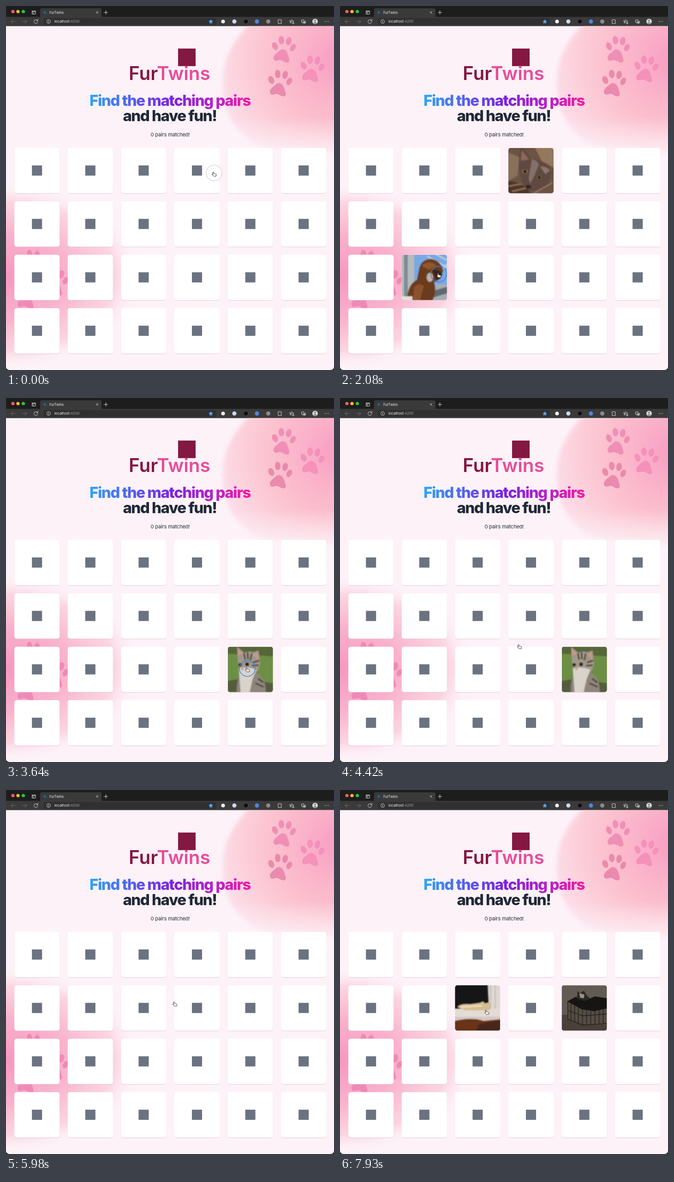
An HTML page for the animation above (8000 ms loop, 711 px wide and 787 px high).

```html
<!DOCTYPE html>
<html lang="en">
<head>
<meta charset="utf-8">
<title>FurTwins</title>
<style>
  html, body { margin: 0; width: 100%; height: 100%; overflow: hidden; background: #151515; }
  svg { display: block; width: 711px; height: 787px; font-family: Inter, "Liberation Sans", sans-serif; }
  .line { fill: none; stroke: #d8d8d8; stroke-linecap: round; stroke-linejoin: round; }
  .dim { stroke: #6d6d6d; }
  .title { font-size: 33px; font-weight: 800; letter-spacing: -.045em; text-anchor: middle; }
  .logo { font-size: 40.5px; font-weight: 600; }

  .shot { opacity: 0; animation: 8s step-end infinite; }
  #shot0 { animation-name: show0; }
  #shot1 { animation-name: show1; }
  #shot2 { animation-name: show2; }
  #shot3 { animation-name: show3; }
  #shot4 { animation-name: show4; }
  #shot5 { animation-name: show5; }
  @keyframes show0 { 0%, 37.4% { opacity: 0 } 1.6% { opacity: 1 } }
  @keyframes show1 { 0%, 37.4% { opacity: 0 } 24.4% { opacity: 1 } }
  @keyframes show2 { 0%, 74.7% { opacity: 0 } 43.9% { opacity: 1 } }
  @keyframes show3 { 0%, 74.7% { opacity: 0 } 61.7% { opacity: 1 } }
  @keyframes show4 { 0% { opacity: 0 } 81.2%, 100% { opacity: 1 } }
  @keyframes show5 { 0% { opacity: 0 } 94.2%, 100% { opacity: 1 } }

  /* the pointer rests on each card after a tap, then glides to the next */
  #cursor { animation: move 8s ease-in-out infinite; }
  @keyframes move {
    0% { transform: translate(451px, 364px) }
    9% { transform: translate(451px, 364px); animation-timing-function: ease-in }
    13% { transform: translate(438px, 408px); animation-timing-function: cubic-bezier(.3, .4, .3, 1) }
    22.5%, 30% { transform: translate(214px, 583px) }
    42.5%, 51% { transform: translate(523px, 588px) }
    60.5%, 69% { transform: translate(197px, 467px) }
    80%, 87% { transform: translate(509px, 460px) }
    93.2%, 100% { transform: translate(318px, 481px) }
  }
  .tap { opacity: 0; animation: tap 8s linear infinite; animation-delay: calc(var(--at) * 1ms - 8s); }
  @keyframes tap {
    0% { opacity: 1; stroke: #d9d9e2; fill: rgba(255, 255, 255, .8) }
    1% { opacity: 1; stroke: #3b82e0; fill: rgba(255, 255, 255, 0) }
    3.4% { opacity: .9; stroke: #3b82e0; fill: rgba(255, 255, 255, 0) }
    5%, 100% { opacity: 0; stroke: #3b82e0; fill: rgba(255, 255, 255, 0) }
  }
</style>
</head>
<body>
<svg viewBox="0 0 711 787">
  <defs>
    <linearGradient id="rainbow" gradientUnits="userSpaceOnUse" x1="180" x2="532">
      <stop stop-color="#2aa6f4"/><stop offset=".28" stop-color="#5659f2"/>
      <stop offset=".5" stop-color="#7a22e2"/><stop offset=".78" stop-color="#bd1fc6"/>
      <stop offset="1" stop-color="#f41ba2"/>
    </linearGradient>
    <radialGradient id="glowRight" gradientUnits="userSpaceOnUse" cx="725" cy="115" r="262">
      <stop stop-color="#f79cc3"/><stop offset=".3" stop-color="#fab1c9"/>
      <stop offset=".6" stop-color="#fcc2cf"/><stop offset="1" stop-color="#fcdce6"/>
    </radialGradient>
    <radialGradient id="glowLeft">
      <stop stop-color="#f798c0"/><stop offset=".45" stop-color="#f9aeca" stop-opacity=".95"/>
      <stop offset=".8" stop-color="#fbc0d2" stop-opacity=".6"/><stop offset="1" stop-color="#fdf2f8" stop-opacity="0"/>
    </radialGradient>
    <linearGradient id="fade" x2="0" y2="1">
      <stop stop-color="#fdf2f8" stop-opacity="0"/><stop offset="1" stop-color="#fdf2f8"/>
    </linearGradient>
    <filter id="soft"><feGaussianBlur stdDeviation="5"/></filter>
    <filter id="fuzz"><feGaussianBlur stdDeviation="1"/></filter>
    <clipPath id="page"><path d="M0 43.500H711V779q0 8-8 8H8q-8 0-8-8Z"/></clipPath>
    <clipPath id="frame"><rect width="98" height="98" rx="5"/></clipPath>
    <g id="paw">
      <ellipse cx="-19" cy="-7" rx="6" ry="9" transform="rotate(-24 -19 -7)"/>
      <ellipse cx="-5" cy="-20" rx="6" ry="9" transform="rotate(-5 -5 -20)"/>
      <ellipse cx="11" cy="-18" rx="6" ry="9" transform="rotate(12 11 -18)"/>
      <ellipse cx="20" cy="-4" rx="5.5" ry="8.500" transform="rotate(28 20 -4)"/>
      <path d="M-22 18C-22 11-11 5-7 1-3-3 6 1 9 10 11 20 16 25 9 28 3 30-1 23-8 23-15 24-21 28-22 18Z"/>
    </g>
    <g id="card">
      <rect y="1.200" width="98" height="98" rx="5" fill="#d9c3d0" opacity=".65"/>
      <rect width="98" height="98" rx="5" fill="#fff"/>
      <rect x="38" y="38" width="22" height="22" fill="#6b7280"/>
    </g>
  </defs>

  <!-- browser bars -->
  <rect width="711" height="46" fill="#1d1d1e"/>
  <path d="M74 23.500V8q0-3 3-3H204q3 0 3 3V23.500H711V44H0V23.500Z" fill="#3a3a3b"/>
  <rect x="82" y="26" width="373" height="15" rx="3" fill="#303031"/>
  <circle cx="15" cy="12" r="3.600" fill="#ff5f57"/>
  <circle cx="26" cy="12" r="3.600" fill="#febc2e"/>
  <circle cx="37.500" cy="12" r="3.600" fill="#28c840"/>
  <circle cx="84" cy="14" r="3" fill="#1d5f8f"/>
  <text x="94" y="17" font-size="7.4" fill="#f0f0f0">FurTwins</text>
  <text x="105" y="36.300" font-size="7.7" fill="#f2f2f2">localhost<tspan fill="#a5a5a5">:4200</tspan></text>
  <g class="line">
    <path d="M57 10.500H64V17.500H57ZM57 12.500H64M59 12.500V17.500M195.500 12l4 4m0-4l-4 4M216.500 10v8m-4-4h8"/>
    <path class="dim" d="M20 33.500H11l4-4m-4 4l4 4M36 33.500h9l-4-4m4 4l-4 4"/>
    <path d="M68.500 31.500A4.200 4.200 0 1 0 69 34.500M69 29v3h-3"/>
    <circle cx="92.500" cy="33.500" r="4"/><path d="M92.500 33v2.500M92.500 31.300v.1"/>
    <path d="M590 30h2q1-2 2 0h3v3q-2 .7 0 2v3h-7v-3q2-1 0-2Z"/>
    <path d="M619 29l1.300 3 3.500.3-2.700 2.300M618 36l-2 1 .5-3-2-2 3-.3ZM620 37h5m-2.500-2.500v5"/>
    <path d="M641 30h5v5h-5ZM643 37h6v-5m-2 1.500v4m-2-2h4"/>
  </g>
  <path d="M444 28.500l1.500 3.300 3.600.4-2.700 2.400.8 3.600-3.200-1.800-3.200 1.800.8-3.600-2.700-2.400 3.600-.4Z" fill="#5ba4f5"/>
  <circle cx="470.500" cy="33.500" r="4" fill="#f1f1f1"/>
  <circle cx="495" cy="33.500" r="4.500" fill="#c9d8ee"/>
  <circle cx="520" cy="33.500" r="4" fill="#0c0c0c"/>
  <circle cx="544" cy="33.500" r="4.500" fill="#4d86e8"/>
  <circle cx="568.500" cy="33.500" r="4.500" fill="#8b8b8b"/>
  <circle cx="670" cy="33.500" r="6" fill="#d6d6d6"/>
  <circle cx="670" cy="31.700" r="2.100" fill="#8c8c8c"/><path d="M666 37.500q4-6 8 0-4 3-8 0" fill="#8c8c8c"/>
  <path d="M692 33.500h.1m3.400 0h.1m3.400 0h.1" class="line" stroke-width="1.600"/>

  <!-- page -->
  <g clip-path="url(#page)">
    <rect y="43" width="711" height="744" fill="#fdf2f8"/>
    <path d="M537 30C488 75 469 120 470 172 472 235 500 270 537 298 600 320 680 300 740 330V30Z" fill="url(#glowRight)" filter="url(#soft)"/>
    <rect x="455" y="240" width="256" height="95" fill="url(#fade)"/>
    <ellipse cx="0" cy="585" rx="295" ry="200" fill="url(#glowLeft)"/>
    <use href="#paw" x="602" y="94" fill="#f08fb6"/>
    <use href="#paw" x="664" y="136" fill="#f591ba"/>
    <use href="#paw" x="594" y="167" fill="#ea8aac"/>
    <g fill="#f189b5">
      <use href="#paw" x="56" y="556"/><use href="#paw" x="109" y="598"/><use href="#paw" x="47" y="626"/>
    </g>
    <rect x="373" y="92" width="38" height="38" fill="#831843"/>
    <text class="logo" x="266" y="160" fill="#831843">Fur<tspan fill="#e64d99">Twins</tspan></text>
    <text class="title" x="355.500" y="216" fill="url(#rainbow)">Find the matching pairs</text>
    <text class="title" x="355" y="249" fill="#1f2937">and have fun!</text>
    <text x="356" y="281.800" font-size="11" letter-spacing="-.15" text-anchor="middle" fill="#1f2937">0 pairs matched!</text>
    <g id="cards"></g>
  </g>

  <!-- photos -->
  <g id="shot0" class="shot"><g clip-path="url(#frame)"><g filter="url(#fuzz)">
    <path d="M-5-5H103V103H-5Z" fill="#6c5342"/>
    <path d="M55-5H103V45L72 28Z" fill="#94795f"/>
    <path d="M-5 8L24 20 20 60-5 75Z" fill="#88705a"/>
    <path d="M22 38L25 2q2-5 8 0L50 24Q82 25 94 52L86 82Q65 99 41 91 25 72 22 38Z" fill="#614a40"/>
    <path d="M27 28L29 5 45 25Z" fill="#8a6a5a"/>
    <path d="M51 24Q62 27 66 36L56 61 47 78 44 65Z" fill="#84706a"/>
    <path d="M69 40Q84 40 90 49L80 57Z" fill="#8d7468"/>
    <path d="M-5 72Q20 70 41 89L52 103H-5Z" fill="#4d362b"/>
    <path d="M0 83L28 78M8 94L38 87M55 98L96 75" stroke="#94745b" stroke-width="3"/>
    <ellipse cx="36" cy="51" rx="6" ry="4.500" fill="#96763e"/><circle cx="36" cy="51" r="3.500" fill="#181412"/>
    <ellipse cx="67" cy="64" rx="5" ry="3.500" fill="#806434"/><circle cx="67" cy="64" r="2.800" fill="#181412"/>
    <ellipse cx="43" cy="84" rx="6" ry="4" fill="#302722"/>
  </g></g></g>

  <g id="shot1" class="shot"><g clip-path="url(#frame)"><g filter="url(#fuzz)">
    <path d="M-5-5H103V103H-5Z" fill="#79a9e3"/>
    <path d="M55 3L100 28M70-3L98 12M77 45L100 18" stroke="#c1d3e5" stroke-width="3"/>
    <path d="M-5-5H27V103H-5Z" fill="#b5bcbe"/><path d="M5-5H13V103H5Z" fill="#7e8b91"/>
    <path d="M65 64H103V103H65Z" fill="#a6adb5"/><path d="M68 78L103 68V82L70 92Z" fill="#616b70"/>
    <path d="M12 103Q10 67 33 54L38 29Q43 10 64 9 85 13 90 34L84 52 70 60Q77 78 65 103Z" fill="#6b3a1d"/>
    <path d="M27 69Q38 60 48 67L39 102H24Z" fill="#8a532f"/>
    <path d="M43 24Q59 9 76 23L60 33Z" fill="#92562c"/>
    <path d="M66 33Q86 30 88 45L75 55Z" fill="#39251b"/>
    <ellipse cx="61" cy="49" rx="7" ry="10" fill="#beb2a5"/>
    <path d="M-5 90H23V103H-5Z" fill="#e2dfd8"/>
  </g></g></g>

  <g id="shot2" class="shot"><g clip-path="url(#frame)"><g filter="url(#fuzz)">
    <path d="M-5-5H103V103H-5Z" fill="#6d8f45"/><path d="M-5-5H103V21L-5 15Z" fill="#556637"/>
    <path d="M-5 75L35 68 103 80V103H-5Z" fill="#555b3e"/>
    <path d="M20 103Q17 73 30 56H62Q85 68 82 103Z" fill="#8f857a"/>
    <path d="M22 31L20 0 36 13Q46 8 55 12L67 8 70 36Q68 58 47 62 25 57 22 31Z" fill="#a3978a"/>
    <path d="M22 20L22 3 34 15ZM55 16L65 12 67 30Z" fill="#c69a88"/>
    <path d="M24 47Q44 42 62 50L54 70 47 101H28Z" fill="#d9d3cc"/>
    <path d="M35 14L38 28M43 12L44 27M52 15L49 29M55 34L68 30M53 41L67 40M66 69L77 77M60 79L78 87" stroke="#3d3a33" stroke-width="3"/>
    <circle cx="27" cy="39" r="3.500" fill="#202422"/><circle cx="42" cy="38" r="4" fill="#202422"/>
    <path d="M29 47h6l-3 4Z" fill="#b7776e"/>
  </g></g></g>

  <g id="shot3" class="shot"><g clip-path="url(#frame)"><g filter="url(#fuzz)">
    <path d="M-5-5H103V103H-5Z" fill="#39291f"/><path d="M-5-5H28V31L-5 40Z" fill="#8b4e24"/>
    <path d="M67-5H103V35H72Z" fill="#654630"/>
    <path d="M-5 55L65 78 57 103H-5Z" fill="#b92f1e"/><path d="M-5 75L40 89 28 103H-5Z" fill="#5a251a"/>
    <path d="M8 33L14 13 31 22 42 0 52 25Q84 12 94 40L98 85 73 97 45 76 25 69 10 52Z" fill="#8d7251"/>
    <path d="M13 27L17 19 27 27ZM39 22L43 6 48 25Z" fill="#c59568"/>
    <path d="M21 28L34 40M34 23L38 35M58 28L65 51M70 25L79 48M83 32L88 59" stroke="#5d4b38" stroke-width="4"/>
    <ellipse cx="30" cy="53" rx="14" ry="8" fill="#c7ad86"/><ellipse cx="47" cy="69" rx="11" ry="13" fill="#d2bd9e"/>
    <path d="M71 77L94 73 98 88 73 96Z" fill="#c7b799"/>
    <circle cx="24" cy="43" r="3" fill="#252620"/><circle cx="42" cy="41" r="3" fill="#252620"/>
  </g></g></g>

  <g id="shot4" class="shot"><g clip-path="url(#frame)">
    <path d="M0 0H98V98H0Z" fill="#625b53"/><path d="M0 64H98V98H0Z" fill="#494139"/>
    <path d="M13 37L44 53 98 43V87L45 84 13 72Z" fill="#554c43"/>
    <path d="M13 35V73L45 86 98 83M20 39V75M28 43V79M36 47V82M45 50V86M54 53V85M63 52V85M72 53V84M81 50V84M90 48V83M13 54L45 66 98 62" fill="none" stroke="#211e1b" stroke-width="1.300"/>
    <path d="M12 35L30 25 53 32 72 24 98 28V50L71 56 43 52Z" fill="#171513"/>
    <path d="M33 29L34 13 40 17 48 12 55 23 62 29 49 34Z" fill="#2c2824"/>
    <path d="M38 17L49 20 48 28 40 27Z" fill="#a19385"/>
  </g></g>

  <g id="shot5" class="shot"><g clip-path="url(#frame)"><g filter="url(#fuzz)">
    <path d="M-5-5H103V103H-5Z" fill="#171412"/><path d="M71-5H103V80H75Z" fill="#dfd7d2"/>
    <path d="M77-5V52M87-5V54" stroke="#c0b7b3" stroke-width="2"/>
    <path d="M-5 51L103 50V80H-5Z" fill="#e4dbd4"/><path d="M-5 68H103V77H-5Z" fill="#d3c8c5"/>
    <path d="M-5 78Q35 68 62 77L103 73V103H-5Z" fill="#6b3018"/><path d="M52 84L103 75V103H43Z" fill="#49251a"/>
    <path d="M5 47Q12 39 32 41L54 38 60 35 65 39 74 37 79 48 73 54 21 54Z" fill="#d6bc91"/>
    <path d="M12 47L59 44" stroke="#efdbb7" stroke-width="4"/>
  </g></g></g>

  <g id="cursor">
    <g id="taps" stroke-width="1.500"></g>
    <path d="M-3-4.500q1.300-1.400 2.200.2L0-1.300q1-.8 1.700.2 1.200-.7 1.700.4 1.300-.2 1.400 1.200L4.300 4H-.7L-4.300.5q-.2-1.400 1.300-1l1 .7Z" fill="#fff" stroke="#252525" stroke-width=".9" stroke-linejoin="round"/>
  </g>
</svg>
<script>
  const byId = id => document.getElementById(id);
  const place = i => `translate(${18.2 + i % 6 * 115.6} ${306.7 + Math.floor(i / 6) * 115.5})`;

  byId("cards").innerHTML = Array.from({ length: 24 }, (_, i) =>
    `<use href="#card" transform="${place(i)}"/>`).join("");

  const openCards = [3, 13, 16, 7, 10, 8];
  openCards.forEach((card, i) => byId("shot" + i).setAttribute("transform", place(card)));

  const tapTimes = [0, 1920, 3480, 4910, 6470, 7480];
  byId("taps").innerHTML = tapTimes.map(at =>
    `<circle class="tap" cy="-3" r="17" style="--at:${at}"/>`).join("");
</script>
</body>
</html>
```
